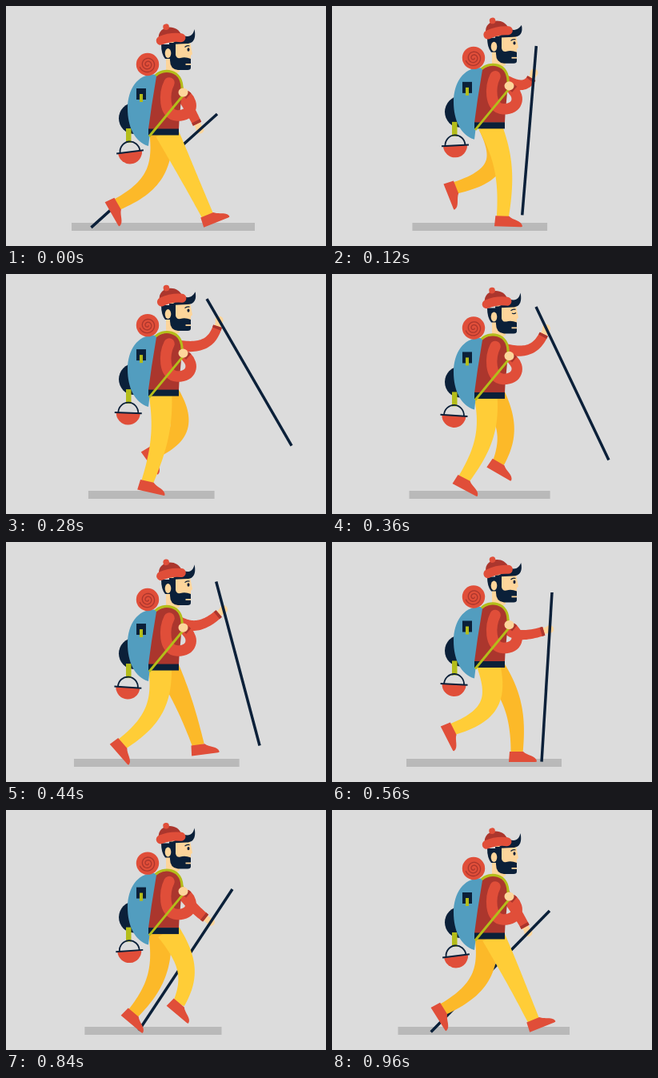
An HTML page with a canvas for the animation above (1000 ms loop, 400x300 px).

```html
<!DOCTYPE html>
<html lang="en">
<head>
<meta charset="utf-8">
<title>Hiker</title>
<style>
html, body { margin: 0; height: 100%; overflow: hidden; background: #dcdcdc; }
canvas { display: block; }
</style>
</head>
<body>
<canvas id="stage" width="400" height="300"></canvas>
<script>
const g = document.getElementById('stage').getContext('2d');
const RED = '#e04e39', DARK = '#ab362d', NAVY = '#0b2039', YELLOW = '#ffcd37', AMBER = '#fcb929',
  BLUE = '#529dbf', GREEN = '#b4bd1a', SKIN = '#fdd59b', BACK = '#dcdcdc', BAR = '#b9b9b9';
const LOOP = 1000, STEP = 40, RAD = Math.PI / 180;

// time, body lift, ground bar left, ground bar right (every half loop)
const BODY = [
  [0, 0, 82, 311], [60, -4.5, 93, 287], [190, -10.7, 105.5, 256],
  [350, -6, 97.5, 271], [460, 0, 82.5, 297]
];
// time, ankle x y, knee x y, foot angle
const NEAR_LEG = [
  [0, 252, 262, 224, 204, -22], [60, 233, 263, 234, 201, 0], [200, 190, 263, 201, 200, 2],
  [360, 165, 256, 199, 205, 28], [480, 139, 249, 198, 219, 58], [560, 151, 234, 213, 212, 63],
  [680, 172, 213, 236, 192, 55], [840, 216, 242, 237, 199, 40], [960, 252, 263, 225, 204, -22]
];
const FAR_LEG = [
  [0, 139, 248, 198, 219, 60], [60, 148, 238, 207, 215, 63], [200, 165, 218, 238, 200, 70],
  [360, 208, 236, 226, 196, 30], [480, 251, 262, 225, 204, -20], [560, 231, 263, 234, 201, 0],
  [680, 188, 263, 192, 200, 2], [840, 159, 254, 198, 210, 40], [960, 139, 249, 198, 218, 58]
];
// time, stick top x y, stick angle, grip distance, elbow x y
const STICK = [
  [0, 264, 135, 138, 29, 230, 128], [100, 257, 60, 103, 33, 240, 112],
  [200, 249, 26, 62.7, 35, 258, 92], [280, 251, 31, 60, 31, 258, 96],
  [360, 255, 41, 64.6, 30, 254, 104], [560, 275, 63, 93.5, 46, 222, 126],
  [680, 285, 83, 115.8, 50, 228, 116], [840, 283, 99, 123.5, 49, 231, 122],
  [960, 272, 126, 134.4, 38, 231, 126]
];
// time, pot angle, hat angle, hat shift, quiff drop
const SWAY = [
  [0, -7, 0, 0, 0], [200, 0, -5, 2, 4], [360, 3.5, 0, 0, 0], [560, 3, -4, 1.5, 1.5],
  [680, 0, -5, 2, 4], [840, -4, 0, 0, 0], [960, -7, 0, 0, 0]
];

// Smooth periodic curve through the keys
function at(keys, t, period = LOOP) {
  t %= period;
  const n = keys.length;
  const key = i => {
    const turn = Math.floor(i / n), k = keys[i - turn * n];
    return [k[0] + turn * period, ...k.slice(1)];
  };
  let i = n - 1;
  while (keys[i][0] > t) i--;
  const [a, b, c, d] = [i - 1, i, i + 1, i + 2].map(key);
  const h = c[0] - b[0], u = (t - b[0]) / h, v = 1 - u;
  return b.slice(1).map((p, j) => {
    const q = c[j + 1];
    const m0 = (q - a[j + 1]) / (c[0] - a[0]) * h, m1 = (d[j + 1] - p) / (d[0] - b[0]) * h;
    return v * v * (1 + 2 * u) * p + u * v * v * m0 + u * u * (3 - 2 * u) * q - u * u * v * m1;
  });
}

function fill(d, color) {
  g.fillStyle = color;
  g.fill(new Path2D(d));
}
function line(d, color, width, cap = 'butt') {
  g.strokeStyle = color;
  g.lineWidth = width;
  g.lineCap = cap;
  g.stroke(new Path2D(d));
}
function oval(x, y, rx, ry, color) {
  g.fillStyle = color;
  g.beginPath();
  g.ellipse(x, y, rx, ry, 0, 0, 7);
  g.fill();
}
function box(x, y, w, h, color) {
  g.fillStyle = color;
  g.fillRect(x, y, w, h);
}
function turned(x, y, angle, draw) {
  g.save();
  g.translate(x, y);
  g.rotate(angle * RAD);
  draw();
  g.restore();
}

// Tapered limb from a over bend k to b, drawn between u0 and u1
function limb(a, k, b, w0, w1, color, u0 = 0, u1 = 1, pull = 0.75) {
  const mix = (p, q) => p.map((v, i) => v + (q[i] - v) * pull);
  const c = mix(a, k), e = mix(b, k), left = [], right = [];
  for (let i = 0; i <= 30; i++) {
    const u = u0 + (u1 - u0) * i / 30, v = 1 - u;
    const [x, y] = [0, 1].map(j =>
      v * v * v * a[j] + 3 * v * v * u * c[j] + 3 * v * u * u * e[j] + u * u * u * b[j]);
    const [dx, dy] = [0, 1].map(j =>
      v * v * (c[j] - a[j]) + 2 * v * u * (e[j] - c[j]) + u * u * (b[j] - e[j]));
    const r = (w0 + (w1 - w0) * u) / 2 / Math.hypot(dx, dy);
    left.push([x - dy * r, y + dx * r]);
    right.unshift([x + dy * r, y - dx * r]);
  }
  fill('M' + left.concat(right).join('L') + 'Z', color);
}

function leg(keys, t, phase, lift, color) {
  const [x, y, kx, ky, angle] = at(keys, t);
  const hip = [197 + 5 * Math.cos((t + phase) / LOOP * 2 * Math.PI), 157 + lift];
  limb(hip, [kx, ky], [x, y], 29, 15, color);
  turned(x, y, angle, () => fill('M-9-1L8-1C13 4 24 4 25 11Q25 12 23 12L-10 12Z', RED));
}

function farArm(t, lift) {
  const [x, y, angle, grip, ex, ey] = at(STICK, t);
  const dx = Math.cos(angle * RAD), dy = Math.sin(angle * RAD);
  const hand = [x + dx * grip, y + dy * grip], elbow = [ex, ey], shoulder = [211, 98 + lift];
  const reach = 2.2 * Math.hypot(hand[0] - ex, hand[1] - ey);
  const cuff = 1 - 8 / reach;
  limb(shoulder, elbow, hand, 9, 8, SKIN);
  oval(...hand, 5, 5, SKIN);
  limb(shoulder, elbow, hand, 14, 11, RED, 0, cuff);
  limb(shoulder, elbow, hand, 14, 11, DARK, cuff - 4 / reach, cuff);
  line(`M${x} ${y}L${x + dx * 212} ${y + dy * 212}`, NAVY, 3.5);
}

function pot() {
  line('M-12.5 14A12.5 13 0 0 1 12.5 14', NAVY, 1.8);
  fill('M-15 14A15 15 0 0 0 15 14Z', RED);
  line('M-17 14H17', NAVY, 2);
}

function pack(potAngle) {
  oval(160, 140.5, 19, 19.5, NAVY);
  box(150, 153, 6.5, 18, GREEN);
  turned(153.3, 168.5, potAngle, pot);
  fill('M190 86C167 82 152 102 152 128C152 151 161 170 178 175L181 150L190 100Z', BLUE);
  box(163, 103, 12, 14, NAVY);
  box(167, 110, 4, 10, GREEN);
  oval(177, 73, 14.2, 14.2, RED);
  let d = '';
  for (let a = 0; a < 15.5; a += 0.2) {
    const r = 1 + a * 0.6;
    d += (d ? 'L' : 'M') + [177 + r * Math.cos(a), 73 + r * Math.sin(a)];
  }
  line(d, DARK, 1.3);
}

function torso() {
  fill('M200 58H217V82Q208 89 200 82Z', SKIN);
  fill('M188 88C195 80 214 79 219 92C221 110 217 130 216 154H178L182 125Z', DARK);
  box(178, 153.5, 38, 8, NAVY);
  line('M187 87C194 78 222 77 220 106', GREEN, 3.2);
  line('M204 96C198 108 196 136 214 137C233 137 235 122 226 113', RED, 13.5, 'round');
  line('M222 111L179 163', GREEN, 3);
  line('M223.5 114.5L229.5 107.5', DARK, 4.5);
  oval(221.5, 108, 6, 5.6, SKIN);
}

function head(hatAngle, hatShift, drop, blink) {
  fill('M194 48H208V66H199Q194 60 194 48Z', NAVY);
  fill('M205 45H230L233 60L231 62V72H205Z', SKIN);
  fill('M204 46H212V61Q213 66 218 65Q224 63 231 66V77Q231 80 227 80H215Q205 79 205 68Z', NAVY);
  oval(202.5, 59, 3.8, 6, SKIN);
  box(224.5, 72, 6.5, 1.8, SKIN);
  if (blink) {
    line('M225 54.5Q227.5 56 230 54', NAVY, 1.2);
  } else {
    oval(228, 54.5, 1.5, 2.2, NAVY);
  }
  line('M223.5 51.5Q226 49 229.5 50', NAVY, 1.2);
  const tip = 29 + drop, tx = 235.5 + drop / 2;
  fill(`M206 48L222 37C230 40 234 36 ${tx} ${tip}C${tx + 2} ${tip + 9} 236 47 226 47Z`, NAVY);
  turned(206 + hatShift, 41, hatAngle - 8, () => {
    fill('M-15-2C-15-19 11-19 14-2Z', DARK);
    oval(-3.8, -15.5, 3.8, 3.8, RED);
    line('M-13 .5Q0-3 13 .5', RED, 11, 'round');
  });
}

function draw(t) {
  const [lift, left, right] = at(BODY, t, LOOP / 2);
  const [potAngle, hatAngle, hatShift, drop] = at(SWAY, t);
  box(0, 0, 400, 300, BACK);
  box(left, 271, right - left, 10, BAR);
  farArm(t, lift);
  leg(FAR_LEG, t, 630, lift, AMBER);
  leg(NEAR_LEG, t, 130, lift, YELLOW);
  g.save();
  g.translate(0, lift);
  pack(potAngle);
  torso();
  head(hatAngle, hatShift, drop, t >= 320 && t < 440);
  g.restore();
}

function frame() {
  draw(Math.floor(performance.now() % LOOP / STEP) * STEP);
  requestAnimationFrame(frame);
}
frame();
</script>
</body>
</html>
```
